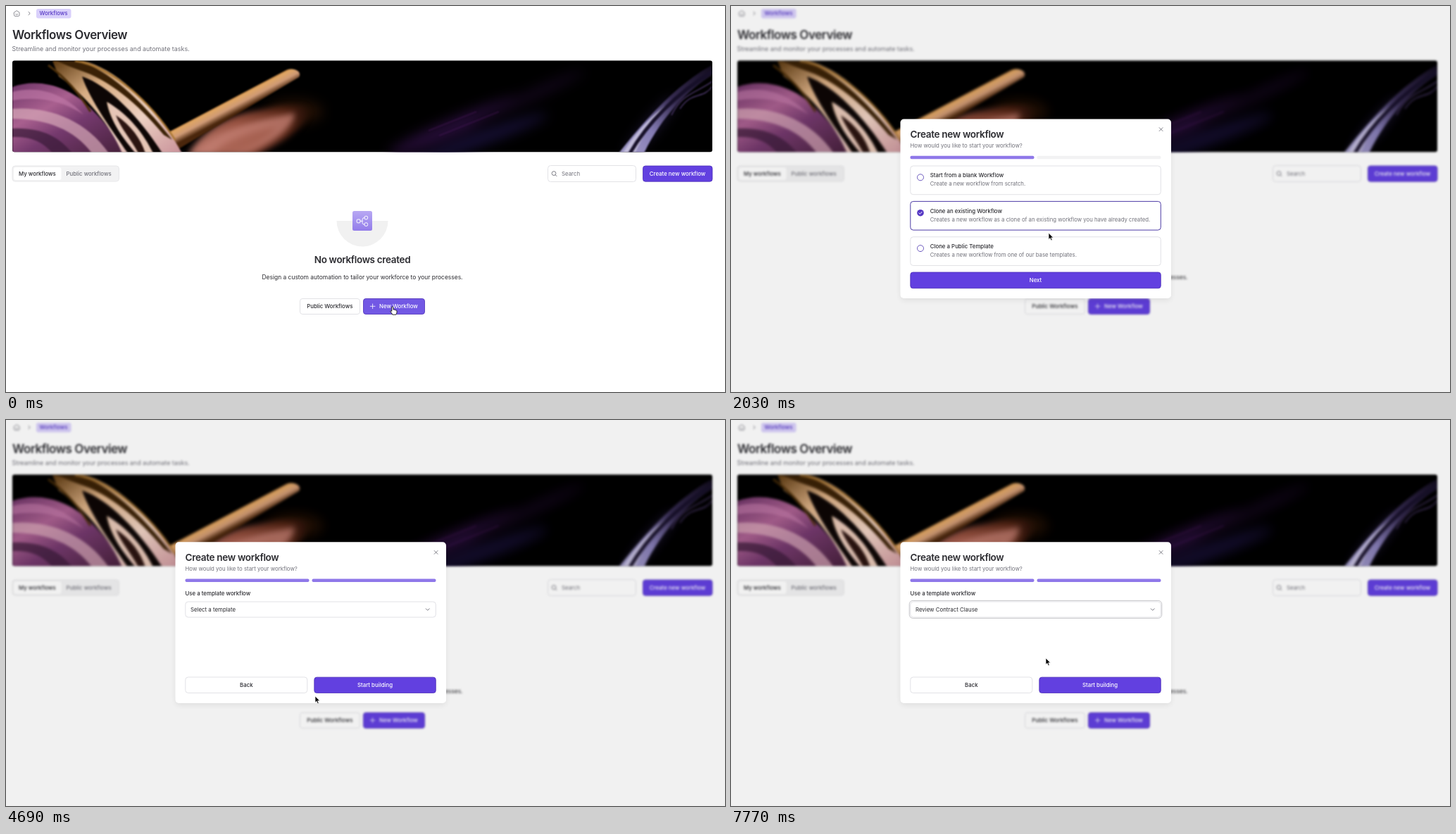
Recreate the animation shown at these times as an HTML page. Size 1021x548 px, loop 8 s.

```html
<!DOCTYPE html>
<html lang="en">
<head>
<meta charset="utf-8">
<title>Create new workflow</title>
<style>
  html, body { margin: 0; width: 100%; height: 100%; overflow: hidden; background: #fff; }
  svg { position: absolute; left: 0; top: 0; width: 1021px; height: 548px; }
  text { font-family: Inter, sans-serif; white-space: pre; }
  .soft { filter: blur(1.2px); }
  .haze { filter: blur(4px); }
  .glow { filter: blur(9px); }
</style>
</head>
<body>
<svg id="page" viewBox="0 0 1021 548">
  <defs>
    <clipPath id="frame"><rect x="9" y="77.5" width="994" height="129.7" rx="3"/></clipPath>
    <linearGradient id="mauve" x2=".9" y2="1">
      <stop stop-color="#6d3467"/><stop offset=".35" stop-color="#a9608f"/><stop offset=".6" stop-color="#74396d"/><stop offset="1" stop-color="#4b2340"/>
    </linearGradient>
    <linearGradient id="cream" x2="1" y2="1">
      <stop stop-color="#5a370e"/><stop offset=".3" stop-color="#d9ae84"/><stop offset=".65" stop-color="#ecd0c2"/><stop offset="1" stop-color="#c9929a"/>
    </linearGradient>
    <linearGradient id="tube" gradientUnits="userSpaceOnUse" x1="313" y1="132" x2="324" y2="153">
      <stop stop-color="#a8651f"/><stop offset=".25" stop-color="#e0a664"/><stop offset=".6" stop-color="#cf9a76"/><stop offset="1" stop-color="#4a260c"/>
    </linearGradient>
    <linearGradient id="petal" gradientUnits="userSpaceOnUse" x1="255" y1="200" x2="445" y2="145">
      <stop stop-color="#b8776a"/><stop offset=".4" stop-color="#96503f"/><stop offset=".75" stop-color="#542414"/><stop offset="1" stop-color="#0e0603"/>
    </linearGradient>
    <linearGradient id="silk" x1="1" y1="0" x2="0" y2="1">
      <stop stop-color="#120c1e"/><stop offset=".4" stop-color="#352a4f"/><stop offset=".7" stop-color="#857cb4"/><stop offset="1" stop-color="#a19ac6"/>
    </linearGradient>
    <linearGradient id="tile" x2="0" y2="1"><stop stop-color="#b8a8f3"/><stop offset=".5" stop-color="#a593ef"/><stop offset="1" stop-color="#937cea"/></linearGradient>
  </defs>
  <g clip-path="url(#frame)">
    <path d="M0 70H1021V215H0Z"/>
    <g class="glow">
      <ellipse cx="410" cy="150" rx="40" ry="16" fill="#241105"/>
      <ellipse cx="640" cy="170" rx="105" ry="12" fill="#260d38" transform="rotate(-23 640 170)"/>
      <ellipse cx="670" cy="190" rx="105" ry="9" fill="#181038" transform="rotate(-20 670 190)"/>
      <ellipse cx="740" cy="130" rx="90" ry="7" fill="#13071c" transform="rotate(-25 740 130)"/>
      <ellipse cx="915" cy="172" rx="55" ry="9" fill="#1d1633" transform="rotate(-50 915 172)"/>
    </g>
    <g class="haze">
      <path d="M258 212C275 180 315 156 350 150C390 142 435 135 428 155C418 180 380 200 352 212Z" fill="url(#petal)"/>
      <path d="M268 212C290 180 335 165 410 152C408 178 370 198 330 212Z" fill="#c47f72" opacity=".8"/>
      <path d="M290 212C315 188 350 178 385 172C368 192 345 202 325 212Z" fill="#97513f" opacity=".5"/>
    </g>
    <g class="soft">
      <path d="M600 177L668 150M615 184L700 150" stroke="#521a62" stroke-width=".8" fill="none"/>
      <path d="M231 179L398 91C410 86 421 94 416 101L245 203Z" fill="url(#tube)"/>
      <path d="M9 115C45 101 92 114 122 147C143 168 158 188 166 209H9Z" fill="url(#mauve)"/>
      <path d="M9 146C58 142 112 160 146 209H122C98 176 58 160 9 160Z" fill="#d8a9b8" opacity=".7"/>
      <path d="M9 174C50 172 76 186 94 209H66C52 192 34 185 9 186Z" fill="#3a1a38" opacity=".7"/>
      <path d="M9 122C48 112 84 126 110 154C80 134 46 128 9 134Z" fill="#c47cab" opacity=".6"/>
      <path d="M66 78H110C150 87 208 133 250 209H165C150 172 112 125 75 100Z" fill="url(#cream)"/>
      <path d="M72 78H104C145 92 190 130 236 190L224 183C187 138 145 104 104 91Q87 85 72 78Z" fill="#3a2106"/>
      <path d="M98 78C150 86 205 136 240 190" fill="none" stroke="#a8752f" stroke-width="2.5"/>
      <path d="M108 100C145 112 190 158 222 209H207C180 170 160 146 143 136C148 164 168 190 184 209H173C151 177 120 135 108 100Z" fill="#0d0605"/>
      <path d="M145 137C175 155 196 182 209 209H186C169 187 150 163 145 137Z" fill="#e6c6b6"/>
      <path d="M156 155C178 170 191 188 198 209H188C177 188 163 174 156 155Z" fill="#2b1410"/>
      <path d="M60 84C82 100 104 124 120 150" fill="none" stroke="#4a2d08" stroke-width="3"/>
      <path d="M870 209C895 177 925 143 955 117C975 101 990 90 1003 84V98C970 118 932 155 906 209Z" fill="url(#silk)"/>
      <path d="M876 209C896 176 917 156 937 141C918 163 903 186 893 209Z" fill="#d0cbe4" opacity=".75"/>
      <path d="M886 209C910 168 950 125 1003 93" fill="none" stroke="#171029" stroke-width="5"/>
      <path d="M945 155C960 124 981 123 1003 107M957 146C974 120 990 133 1003 114" fill="none" stroke="#57407a" stroke-width="1.2"/>
    </g>
  </g>
</svg>
<svg id="front" viewBox="0 0 1021 548"></svg>
<script>
const INK = '#2b2b30', MUTED = '#71717a', LINE = '#e2e2e6', PURPLE = '#6240e0', HOVER = '#7258e4', LILAC = '#8f78e9';
const $ = id => document.getElementById(id);
const clamp = v => Math.max(0, Math.min(1, v));

const rect = (x, y, w, h, r, fill, stroke = 'none', extra = '') =>
  `<rect x="${x}" y="${y}" width="${w}" height="${h}" rx="${r}" fill="${fill}" stroke="${stroke}" ${extra}/>`;
const text = (x, y, s, { size = 7.85, weight = 400, fill = INK, anchor = 'start', spacing = 0 } = {}) =>
  `<text x="${x}" y="${y}" font-size="${size}" font-weight="${weight}" fill="${fill}" text-anchor="${anchor}" letter-spacing="${spacing}em">${s}</text>`;
const line = (d, stroke, width = .9) =>
  `<path d="${d}" fill="none" stroke="${stroke}" stroke-width="${width}" stroke-linecap="round" stroke-linejoin="round"/>`;
const title = (x, y, s, size, anchor) => text(x, y, s, { size, weight: 600, anchor, spacing: -.025 });
const label = (x, y, s, fill = INK, anchor = 'start') => text(x, y, s, { weight: 500, fill, anchor });
const primary = (x, y, w, h, fill = PURPLE, id = '') => rect(x, y, w, h, 3.5, fill, '#4d2fb8', `stroke-width=".8" ${id}`);

$('page').insertAdjacentHTML('beforeend',
  line('M11.5 9.2L15.2 6.6 19 9.2V13Q19 14.4 17.6 14.4H12.9Q11.5 14.4 11.5 13ZM13.7 11.8Q15.2 12.8 16.8 11.8', MUTED, .8) +
  line('M32 8.4L34.2 10.5 32 12.6', MUTED) +
  rect(43, 4, 49.5, 13.5, 3, '#d9d0fb') + label(47.5, 13.4, 'Workflows', '#5537c4') +
  title(9, 47, 'Workflows Overview', 17) +
  text(8.5, 64, 'Streamline and monitor your processes and automate tasks.', { size: 8.92, fill: MUTED }) +
  rect(9, 227, 151.5, 22, 4, '#f2f2f3', '#e7e7e9') + rect(11, 229, 67.5, 18, 3, '#fff') +
  label(18, 241, 'My workflows') + label(85.5, 241, 'Public workflows', MUTED) +
  rect(769.5, 226.5, 125, 23, 4, '#fff', LINE) +
  '<circle cx="778" cy="237.6" r="2.9" fill="none" stroke="#71717a" stroke-width=".9"/>' + line('M780.2 239.8L782 241.6', MUTED) +
  text(789, 241, 'Search', { fill: MUTED }) +
  primary(904.5, 227, 98.5, 22.2) + label(953.6, 241, 'Create new workflow', '#fff', 'middle') +
  '<path d="M469.5 305H542.5A36.5 36.5 0 0 1 469.5 305Z" fill="#f1f1f1"/>' +
  rect(492, 291, 28, 28, 2.5, 'url(#tile)') +
  rect(498.2, 303, 4.8, 4.8, 1, 'none', '#fff') +
  rect(509, 298.3, 4.6, 4.6, 1.8, 'none', '#fff') + rect(509, 307.8, 4.6, 4.6, 1.8, 'none', '#fff') +
  line('M503 305.4H506M509 300.6Q506 300.6 506 303V308Q506 310.2 509 310.2', '#fff') +
  title(506, 364.7, 'No workflows created', 13.5, 'middle') +
  text(506, 388.3, 'Design a custom automation to tailor your workforce to your processes.', { size: 8.45, anchor: 'middle' }) +
  rect(417.5, 415.5, 85, 22, 3.5, '#fff', LINE) + label(459.8, 429.3, 'Public Workflows', INK, 'middle') +
  primary(507.5, 415.5, 87, 22, HOVER, 'id="newButton"') +
  line('M517.3 426.3H524M520.6 423V429.6', '#fff', .8) + label(530, 429.3, 'New Workflow', '#fff'));

const CARDS = [
  ['Start from a blank Workflow', 'Create a new workflow from scratch.'],
  ['Clone an existing Workflow', 'Creates a new workflow as a clone of an existing workflow you have already created.'],
  ['Clone a Public Template', 'Creates a new workflow from one of our base templates.'],
];
const TEMPLATES = ['Research Report', 'Extract Key Contract Details', 'Review Contract Clause', 'US Trademark Search',
  'US Trademark Brief', 'Review Contract', 'Contract Summary Letter', 'Build Event Chronology',
  'Australian Trademark Search', 'Analyze Table', 'Australian Trademark Brief'];

// Pointer moves: start, end, x, y, sideways bend
const MOVES = [
  [0, 70, 548, 427], [700, 1050, 460.5, 285], [1190, 1400, 460, 289], [1820, 2310, 443.5, 350],
  [3360, 3780, 439, 392], [5040, 5600, 474.5, 269, 37], [6370, 7140, 447, 338],
];
const CLICKS = [350, 1680, 3150, 4550, 5672, 7630];

function pointerAt(t) {
  let x = 549, y = 427;
  for (const [start, end, toX, toY, bend = 0] of MOVES) {
    const p = clamp((t - start) / (end - start)) ** .75, e = p * p * (3 - 2 * p);
    x += (toX - x) * e + bend * Math.sin(Math.PI * e);
    y += (toY - y) * e;
  }
  return { x, y };
}

function card(i, selected, hovered) {
  const y = 227 + 50.4 * i, cy = y + 20.3;
  const radio = selected
    ? `<circle cx="269" cy="${y + 16.3}" r="4.8" fill="#5537c4"/>` + line(`M266.9 ${y + 16.5}l1.5 1.5 2.7-3.1`, '#fff', 1)
    : `<circle cx="269" cy="${y + 16.3}" r="4.5" fill="#fff" stroke="#5f4bb8" stroke-width=".9"/>`;
  const pose = hovered ? `transform="translate(432.5 ${cy}) scale(1.0085) translate(-432.5 ${-cy})" style="filter:drop-shadow(0 1px 1.5px #0002)"` : '';
  return `<g ${pose}>` + rect(254.8, y, 355.5, 40.7, 4, '#fff', selected ? '#4e3ca6' : LINE) + radio +
    label(282.7, y + 16.3, CARDS[i][0]) + text(282.7, y + 28.3, CARDS[i][1], { size: 7.77, fill: MUTED }) + '</g>';
}

function dialog(top, bottom, step, body) {
  return rect(240.5, top, 384.5, bottom - top, 5, '#fff', 'none', 'style="filter:drop-shadow(0 3px 4px #00000014)"') +
    title(254.5, top + 26.3, 'Create new workflow', 13.6) +
    text(254.5, top + 40.3, 'How would you like to start your workflow?', { size: 7.85, fill: MUTED }) +
    line(`M608.2 ${top + 12.2}l4.8 4.8m0-4.8l-4.8 4.8`, MUTED) +
    rect(254.5, top + 52.2, 176, 4.6, 2, LILAC) + rect(434.5, top + 52.2, 176, 4.6, 2, step === 2 ? LILAC : '#f2f2f3') + body;
}

function choices(t, { y }) {
  const selected = t < 1820 ? 0 : t < 3290 ? 1 : 2;
  const over = [0, 1, 2].map(i => t >= 630 && y > 226.5 + 50.4 * i && y < 268.3 + 50.4 * i);
  const onNext = t > 700 && y > 378 && y < 401;
  return dialog(160.5, 415, 1, CARDS.map((_, i) => card(i, i === selected, over[i])).join('') +
    primary(254.8, 378, 355.5, 22.7, onNext ? HOVER : PURPLE) + label(432.5, 392.4, 'Next', '#fff', 'middle'));
}

function templates(t) {
  const done = t >= 7770;
  return dialog(173.3, 402, 2,
    label(254.5, 249.4, 'Use a template workflow') +
    (done ? rect(253.2, 256.4, 358.6, 25, 5, 'none', '#c6c6ca') : '') +
    rect(254.8, 258, 355.5, 22, 4, '#fff', LINE) +
    text(262, 271.8, done ? TEMPLATES[2] : 'Select a template') +
    line('M596.2 267.8l2.5 2.5 2.5-2.5', MUTED) +
    rect(254.8, 365, 173, 22.5, 4, '#fff', LINE) + label(341.3, 379.3, 'Back', INK, 'middle') +
    primary(437.8, 365.2, 172.5, 22.3) + label(524, 379.3, 'Start building', '#fff', 'middle'));
}

function menu(t, { y }) {
  const shown = clamp((t - 5810) / 210) * clamp((7770 - t) / 70);
  if (!shown) return '';
  const lit = Math.floor((y - 5 - 286) / 18.3);
  const scale = .95 + .05 * shown;
  return `<g opacity="${shown}" transform="translate(433 283) scale(${scale}) translate(-433 -283)">` +
    rect(255, 283.3, 356.3, 218.4, 4, '#fff', '#dedee2', 'style="filter:drop-shadow(0 2px 3px #0002)"') +
    TEMPLATES.map((name, i) => (i === lit ? rect(258, 304.3 + 18.3 * (i - 1), 350.5, 18.3, 2, '#f1f1f1') : '') +
      text(276, 298 + 18.3 * i, name, { size: 7.8 })).join('') +
    line('M430.8 493.8l2.4 2.4 2.4-2.4', INK) + '</g>';
}

function pointer(t, { x, y }) {
  const onControl = (y > 226.5 && y < 268.3) || (y > 277 && y < 318.7) || (y > 327.3 && y < 369) || (y > 378 && y < 401);
  const hand = t < 490 || (t < 4620 && onControl);
  const click = CLICKS.find(c => t >= c && t < c + 140);
  const ring = click === undefined ? '' :
    `<circle cx="${x}" cy="${y}" r="${Math.max(14.2, 20 - .085 * (t - click))}" fill="#fff" fill-opacity=".25" stroke="#111" stroke-width="1.3"/>`;
  const shape = hand
    ? '<path d="M-1.2 .9C-1.2-.5 1-.5 1 .9V4.2C1.6 3.6 2.8 3.8 3 4.6 3.6 4.2 4.6 4.4 4.8 5.2 5.4 5 6 5.4 6 6.2V8C6 9.6 5 10 4.8 11.2H-.2C-.6 9.6-2 8.6-2.8 7.2-3.6 6-2.4 5.2-1.2 6.4Z" fill="#fff" stroke="#111" stroke-width=".9" stroke-linejoin="round"/>'
    : '<path d="M0 0V9.2L2.1 7.3 3.6 10.7 5.2 10 3.7 6.7H6.6Z" stroke="#fff" stroke-width=".7"/>';
  return ring + `<g transform="translate(${x} ${y})">${shape}</g>`;
}

function draw(t) {
  const open = clamp((t - 420) / 210), at = pointerAt(t), scale = .95 + .05 * open;
  $('page').style.filter = open ? `blur(${1.8 * open}px)` : 'none';
  $('newButton').setAttribute('fill', t < 420 ? HOVER : PURPLE);
  $('front').innerHTML = (open ? rect(0, 0, 1021, 548, 0, '#000', 'none', `opacity="${.054 * open}"`) +
    `<g opacity="${open}" transform="translate(433 288) scale(${scale}) translate(-433 -288)">` +
    (t < 4620 ? choices(t, at) : templates(t)) + '</g>' + menu(t, at) : '') + pointer(t, at);
}

const LOOP = 8000, TICK = 70;
let shownTime = -1;
function play() {
  const t = Math.floor(performance.now() % LOOP / TICK) * TICK;
  if (t !== shownTime) draw(shownTime = t);
  requestAnimationFrame(play);
}
play();
</script>
</body>
</html>
```
